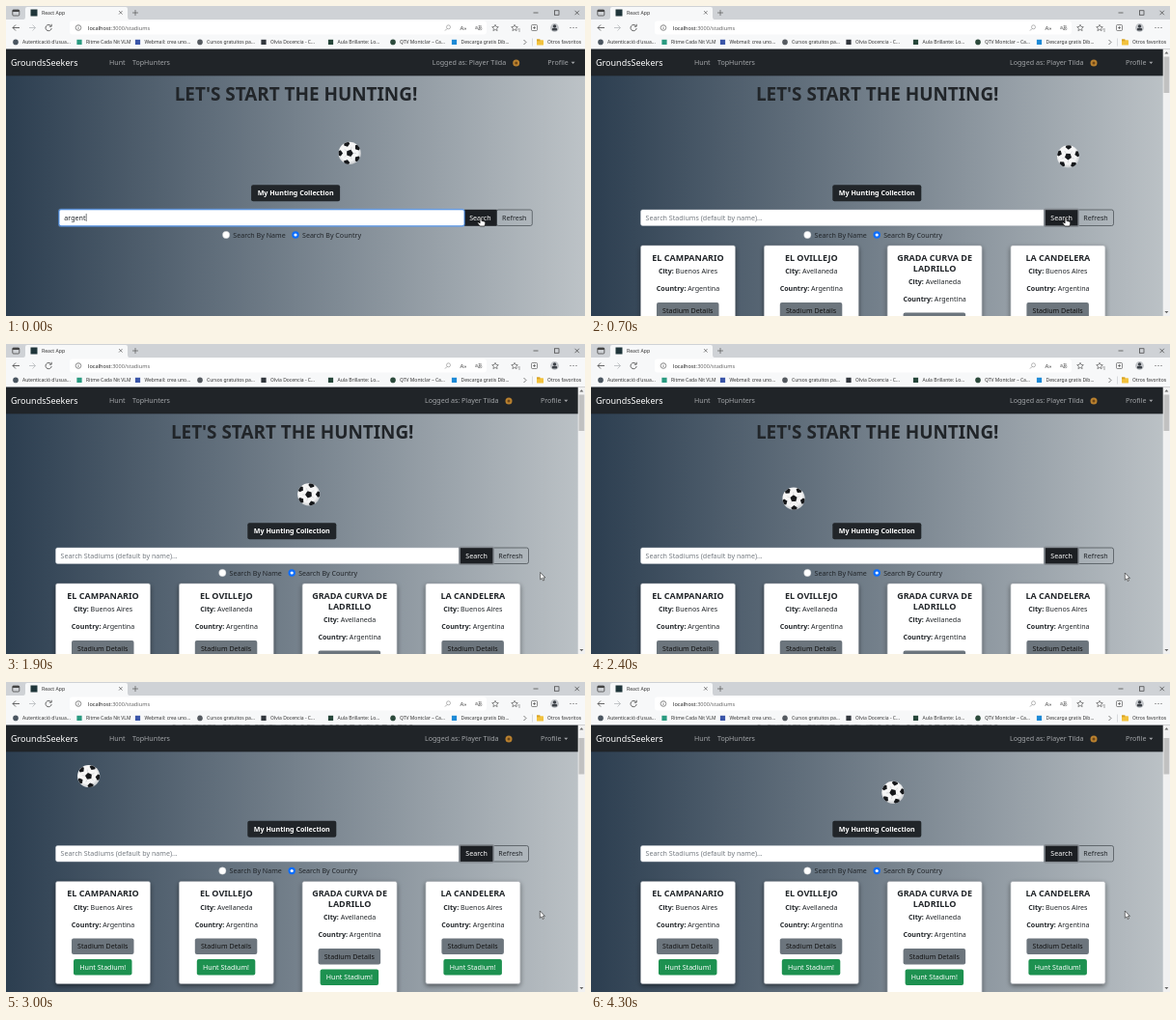
Write an HTML page that moves like this. It is 600 px wide and 321 px high and loops after 4.4 s.

```html
<!DOCTYPE html>
<html lang="en">
<head>
<meta charset="utf-8">
<title>Stadium search</title>
<style>
  html, body { margin: 0; width: 100%; height: 100%; overflow: hidden; background: #fff; }
  svg { display: block; width: 100vw; height: 100vh; }
  text { font-family: "Noto Sans", "Open Sans", "Noto Sans CJK JP", sans-serif; white-space: pre; }
</style>
</head>
<body>
<svg id="stage" viewBox="0 0 600 321"></svg>
<script>
const LOOP = 4400, STEP = 100;
const SEARCH_DONE = 400, SCROLL_START = 2600, SCROLL_END = 2800, SCROLL_BY = 41.5;
const INK = '#212529';

// Drawing helpers that return SVG markup
const rect = (x, y, w, h, fill, extra = '') =>
  `<rect x="${x}" y="${y}" width="${w}" height="${h}" fill="${fill}" ${extra}/>`;
const circle = (x, y, r, fill, extra = '') =>
  `<circle cx="${x}" cy="${y}" r="${r}" fill="${fill}" ${extra}/>`;
const line = (d, color, width = 0.7) =>
  `<path d="${d}" fill="none" stroke="${color}" stroke-width="${width}"/>`;
const text = (x, mid, size, str, fill = INK, extra = '') =>
  `<text x="${x}" y="${mid + size * 0.36}" font-size="${size}" fill="${fill}" ${extra}>${str}</text>`;
const centered = (x, mid, size, str, fill, weight = 400) =>
  text(x, mid, size, str, fill, `text-anchor="middle" font-weight="${weight}"`);
const group = (id, inner, extra = '') => `<g id="${id}" ${extra}>${inner}</g>`;
const button = (x, y, w, h, fill, label, color, weight) =>
  rect(x, y, w, h, fill, 'rx="2"') + centered(x + w / 2, y + h / 2, 7.1, label, color, weight);

function pentagon(cx, cy, r, turn) {
  const points = [0, 1, 2, 3, 4].map(i => {
    const a = turn + i * Math.PI * 0.4;
    return (cx + r * Math.cos(a)).toFixed(2) + ',' + (cy + r * Math.sin(a)).toFixed(2);
  });
  return `<polygon points="${points.join(' ')}" fill="#15171a"/>`;
}

function ball() {
  let marks = pentagon(0, 0, 3.7, 0);
  for (let i = 0; i < 5; i++) {
    const a = i * Math.PI * 0.4, c = Math.cos(a), s = Math.sin(a);
    marks += line(`M${3.5 * c} ${3.5 * s}L${7 * c} ${7 * s}`, '#c4c7ca', 0.5);
    const b = a + Math.PI / 5;
    marks += pentagon(10.4 * Math.cos(b), 10.4 * Math.sin(b), 3.3, b + Math.PI);
  }
  return group('ball', circle(0, 0, 11.6, 'url(#leather)') +
    group('marks', marks, 'clip-path="url(#round)"'));
}

function card(x, title, city) {
  const extra = (title.length - 1) * 10.5, mid = x + 49;
  const field = (y, name, value) =>
    centered(mid, y + extra, 7.1, `<tspan font-weight="700">${name}:</tspan> ${value}`, INK);
  return rect(x, 248, 98, 106 + extra, '#fff', 'rx="2" stroke="#9a9fa4" stroke-width=".5" filter="url(#shadow)"') +
    title.map((t, i) => centered(mid, 260.5 + i * 10.8, 9, t, INK, 600)).join('') +
    field(274.7, 'City', city) + field(292.5, 'Country', 'Argentina') +
    button(x + 16.5, 307 + extra, 64.5, 16.5, '#6c757d', 'Stadium Details', '#111') +
    button(x + 18.5, 328.5 + extra, 60.5, 16.5, '#1d9150', 'Hunt Stadium!', '#fff');
}

function page() {
  const radio = (x, on) => on
    ? circle(x, 237, 3.7, '#0d6efd') + circle(x, 237, 1.6, '#fff')
    : circle(x, 237, 3.7, '#fff', 'stroke="#aeb3b8" stroke-width=".4"');
  const before =
    rect(471, 210.8, 33.8, 17, '#1c1f23') +
    rect(50.4, 209.7, 421.4, 19, '#86b7fe', 'rx="2.5" opacity=".55"') +
    rect(51.2, 210.8, 420, 17, '#fff', 'rx="2" stroke="#2e7be0" stroke-width=".8"') +
    text(56.5, 219, 7.1, 'argent') + line('M79.4 215V223', INK, 0.6);
  const after =
    rect(51.5, 211, 419, 16.5, '#fff', 'rx="2" stroke="#c6cbd0" stroke-width=".5"') +
    text(56.5, 219, 7.1, 'Search Stadiums (default by name)...', '#747a80') +
    rect(469, 209.5, 37, 19.5, '#858b91', 'rx="2"') +
    rect(470.8, 211.2, 33.6, 16.2, '#1c1f23') +
    card(51.5, ['EL CAMPANARIO'], 'Buenos Aires') +
    card(179.3, ['EL OVILLEJO'], 'Avellaneda') +
    card(307.1, ['GRADA CURVA DE', 'LADRILLO'], 'Avellaneda') +
    card(434.9, ['LA CANDELERA'], 'Buenos Aires');
  return centered(296.7, 91, 18.9, "LET'S START THE HUNTING!", INK, 600) +
    button(250.3, 185.3, 92, 17, INK, 'My Hunting Collection', '#fff', 600) +
    rect(504.5, 211, 37, 16.5, 'none', 'rx="2" stroke="#30363b" stroke-width=".6"') +
    centered(523, 219, 7.1, 'Refresh', INK) +
    group('before', before) + group('after', after) +
    centered(487.6, 219, 7.1, 'Search', '#fff') +
    radio(224.3) + text(231.5, 237, 7.1, 'Search By Name') +
    radio(296.2, true) + text(303.2, 237, 7.1, 'Search By Country') +
    ball();
}

function navbar() {
  const soft = '#a2a5a8';
  return rect(0, 44.4, 600, 27.9, '#202428') +
    text(5, 58.8, 9, 'GroundsSeekers', '#fff') +
    text(107, 58.8, 7.1, 'Hunt', soft) + text(131, 58.8, 7.1, 'TopHunters', soft) +
    group('account', text(434, 58.8, 7.1, 'Logged as: Player Tilda', soft) +
      circle(521, 59, 3.5, '#b9812f') + circle(521, 59, 1.5, '#6f4717')) +
    group('profile', text(554, 58.8, 7.1, 'Profile', soft) +
      `<path d="M578.3 57.7h4l-2 2.2z" fill="${soft}"/>`);
}

function browser() {
  const dark = '#444', bookmarks = [
    [10, '#4a5560', "Autenticació d'usua..."], [76, '#2a9a80', 'Ritme Cada Nit VLM'],
    [136.5, '#3a55a8', 'Webmail: crea uno...'], [201, '#555a60', 'Cursos gratuitos pa...'],
    [267, '#31363c', 'Olvia Docencia - C...'], [336.5, '#26463a', 'Aula Brillante: Lo...'],
    [401, '#2c4a3c', 'QTV Montclar – Ca...'], [464.5, '#1d8ad6', 'Descarga gratis Dib...']
  ];
  const star = x => line(`M${x} 19.3l1 2.2 2.3.2-1.7 1.6.5 2.3-2.1-1.2-2.1 1.2.5-2.3-1.7-1.6 2.3-.2z`, dark, 0.6);
  return rect(0, 0, 600, 44.4, '#f7f8f9') + rect(0, 0, 600, 14, '#cfd2d6') +
    rect(6.8, 4, 7, 6, 'none', `rx="1" stroke="${dark}" stroke-width=".8"`) + rect(6.8, 4, 7, 2, dark) +
    `<path d="M18 14Q20 14 20 11V3Q20 1 22 1H124Q126 1 126 3V11Q126 14 128 14Z" fill="#f7f8f9"/>` +
    rect(25.5, 3.5, 7, 7, '#20363b') +
    text(37, 7, 5.1, 'React App', '#333') +
    line('M117 5l3.6 3.6M120.6 5l-3.6 3.6', dark, 0.6) +
    line('M131 7h6M134 4v6', dark, 0.6) +
    line('M546.5 7h5M589.5 4.8l4.4 4.4M593.9 4.8l-4.4 4.4', '#222', 0.6) +
    rect(568.6, 4.8, 4.4, 4.4, 'none', 'stroke="#222" stroke-width=".6"') +
    line('M14 22.5H7M10 19.5l-3 3 3 3', dark, 0.8) +
    line('M24 22.5h6.5M27.5 19.5l3 3-3 3', '#b7babd', 0.8) +
    line('M46.5 20.6a3.1 3.1 0 1 0 .7 2.4M47.2 18.8v2.4h-2.4', dark, 0.8) +
    rect(66, 15.5, 432, 14, '#fff', 'rx="3"') +
    circle(75, 22.5, 2.8, 'none', `stroke="${dark}" stroke-width=".6"`) + line('M75 22v2M75 20.7v.6', dark, 0.6) +
    text(85, 22.5, 5.6, 'localhost<tspan fill="#666">:3000/stadiums</tspan>', '#222') +
    circle(458.5, 21.8, 2, 'none', 'stroke="#888" stroke-width=".6"') + line('M457 23.5l-2 2', '#888') +
    text(470.5, 22.5, 6, 'A»', dark) + text(486, 22.5, 5, 'aあ', dark) +
    star(507) + star(527) + line('M530 24h3M531 26h2', dark, 0.5) +
    rect(544.5, 19.5, 6, 6, 'none', `rx="1" stroke="${dark}" stroke-width=".6"`) + line('M547.5 21v3M546 22.5h3', dark, 0.6) +
    circle(568.5, 22.5, 4.4, '#c3c6ca') + circle(568.5, 21, 1.7, '#3d4248') + rect(565.8, 23, 5.4, 2.4, '#3d4248', 'rx="1"') +
    [585, 588, 591].map(x => circle(x, 22.5, 0.6, dark)).join('') +
    bookmarks.map(([x, color, label], i) =>
      (i % 3 ? rect(x - 2.6, 34.8, 5.2, 5.2, color) : circle(x, 37.4, 2.8, color)) +
      text(x + 7, 37.4, 5, label, '#333')).join('') +
    line('M536.5 35l2.5 2.5-2.5 2.5', dark) + line('M545.5 33.5v8', '#c5c8cb', 0.6) +
    rect(550, 35.3, 7, 5.2, '#f2c23e', 'rx=".6"') + rect(550, 34.3, 3.4, 2, '#d9a321') +
    text(561, 37.4, 5, 'Otros favoritos', '#333');
}

const scrollbar = () => group('scrollbar',
  rect(592.7, 44.4, 7.3, 276.6, '#f1f1f1') +
  '<path d="M594.4 49.6h4l-2-2.3zM594.4 316h4l-2 2.3z" fill="#666"/>' +
  rect(593.5, 52.5, 5.8, 37.5, '#c1c1c1', 'id="thumb"'));

const cursors = () =>
  group('hand', '<path d="M-.9 0Q0-1 .9 0V3.4L4 4.2Q5 4.6 4.8 6L4 9H-.8L-3.4 5.8Q-3.2 4.6-2 5L-.9 6Z" fill="#fff" stroke="#111" stroke-width=".7"/>') +
  group('arrow', '<path d="M0 0V7.4L1.7 5.9 2.9 8.5 4.1 8 3 5.4H5.2Z" fill="#fff" stroke="#222" stroke-width=".6"/>');

const stage = document.getElementById('stage');
stage.innerHTML = `<defs>
  <linearGradient id="sky"><stop stop-color="#2c3e50"/><stop offset="1" stop-color="#bdc3c7"/></linearGradient>
  <radialGradient id="leather" cx=".45" cy=".42" r=".58"><stop offset=".7" stop-color="#f6f6f6"/><stop offset="1" stop-color="#c9cccf"/></radialGradient>
  <clipPath id="round"><circle r="11.5"/></clipPath>
  <filter id="shadow" x="-15%" y="-15%" width="130%" height="130%"><feDropShadow dx="0" dy="2" stdDeviation="2.6" flood-opacity=".45"/></filter>
</defs>` + rect(0, 44.4, 600, 276.6, 'url(#sky)') + group('page', page()) +
  navbar() + browser() + scrollbar() + cursors();

const part = id => document.getElementById(id);
const move = (id, x, y, turn = 0) =>
  part(id).setAttribute('transform', `translate(${x.toFixed(2)} ${y.toFixed(2)}) rotate(${turn.toFixed(1)})`);
const show = (id, on) => part(id).setAttribute('visibility', on ? 'visible' : 'hidden');
const clamp = v => Math.min(1, Math.max(0, v));

// Same curve as the CSS keyword "ease"
function ease(x) {
  let lo = 0, hi = 1, u = 0.5;
  for (let i = 0; i < 20; i++) {
    u = (lo + hi) / 2;
    if (0.75 * u * (1 - u) + u ** 3 < x) lo = u; else hi = u;
  }
  return 0.3 * u * (1 - u) ** 2 + 3 * u * u * (1 - u) + u ** 3;
}

// Runs 0, 1, 0 with the given time for each leg
function pingPong(t, leg) {
  const p = (t / leg) % 2;
  return p > 1 ? 2 - p : p;
}

// time, x, y of the pointer tip
const pointerPath = [
  [0, 492, 219], [900, 492, 219], [1200, 566, 225], [1300, 567, 226],
  [1400, 560.5, 227], [1800, 554, 236], [2000, 553.3, 237], [LOOP, 553.3, 237]
];

function pointerAt(t) {
  const i = pointerPath.findIndex(p => p[0] > t);
  const [t0, x0, y0] = pointerPath[i - 1], [t1, x1, y1] = pointerPath[i];
  const k = (t - t0) / (t1 - t0);
  return [x0 + (x1 - x0) * k, y0 + (y1 - y0) * k];
}

function render(t) {
  const wide = t < SEARCH_DONE;
  const scroll = ease(clamp((t - SCROLL_START) / (SCROLL_END - SCROLL_START)));
  show('before', wide);
  show('after', !wide);
  show('scrollbar', !wide);
  move('page', wide ? 3.8 : 0, -SCROLL_BY * scroll);
  move('account', wide ? 7.7 : 0, 0);
  move('profile', wide ? 7.3 : 0, 0);
  move('thumb', 0, 5.5 * scroll);

  const x = 64.5 + 464 * pingPong(t + 1374, 2238) + (wide ? 3 : 0);
  const y = 139 + 21 * ease(pingPong(t + (wide ? 326 : 200), 200));
  move('ball', x, y);
  move('marks', 0, 0, x * 4.7);

  const [px, py] = pointerAt(t), overButton = px < 541;
  show('hand', overButton);
  show('arrow', !overButton);
  move(overButton ? 'hand' : 'arrow', px, py);
}

const start = performance.now();
function tick() {
  const t = (performance.now() - start) % LOOP;
  render(Math.floor(t / STEP) * STEP);
  requestAnimationFrame(tick);
}
tick();
</script>
</body>
</html>
```
